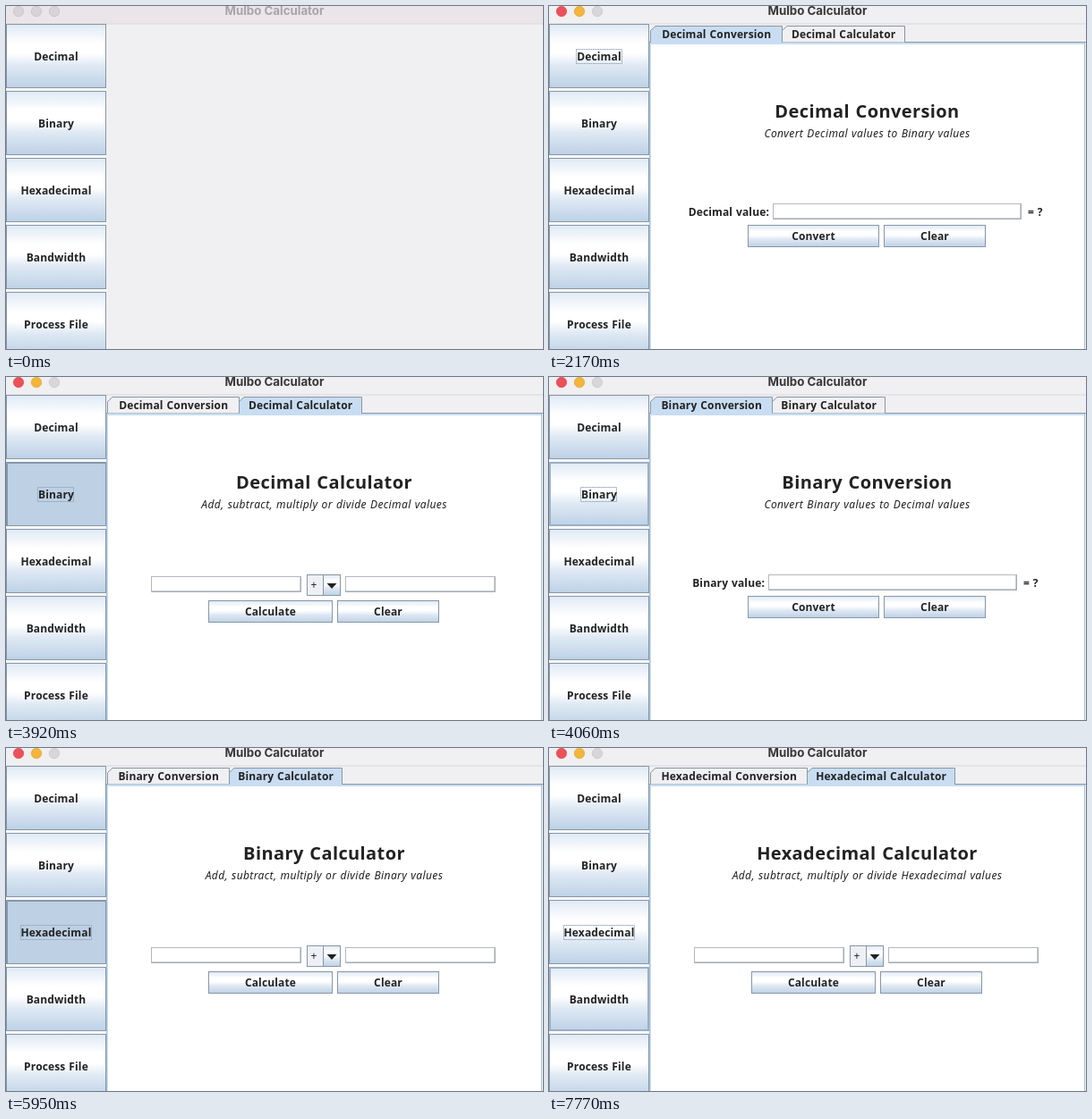
These frames come from a looping animation (600 px wide and 384 px high, 8000 ms). An HTML page:

```html
<!DOCTYPE html>
<html lang="en">
<head>
<meta charset="utf-8">
<title>Calculator demo</title>
<style>
html, body { margin: 0; width: 100%; height: 100%; overflow: hidden; background: #f0f0f2; }
svg { display: block; width: 600px; height: 384px; }
text { font: bold 12px "Noto Sans", "Open Sans", sans-serif; fill: #222; letter-spacing: .012em; word-spacing: .05em; }
.heading { font-size: 20px; letter-spacing: .02em; }
.sub { font-weight: normal; font-style: italic; letter-spacing: .032em; }
.plain { font-weight: normal; }
.title { font: 700 13.3px Inter, Roboto, sans-serif; letter-spacing: 0; word-spacing: 0; }
</style>
</head>
<body>
<svg id="stage" viewBox="0 0 600 384">
  <defs>
    <linearGradient id="metal" x2="0" y2="1">
      <stop stop-color="#dfe9f4"/>
      <stop offset=".3" stop-color="#fff"/>
      <stop offset=".46" stop-color="#fff"/>
      <stop offset=".65" stop-color="#dfe9f4"/>
      <stop offset="1" stop-color="#bdd1e6"/>
    </linearGradient>
  </defs>
  <g id="scene"></g>
</svg>
<script>
const LOOP = 8000, MID = 355.5, EDGE = '#8796a6', BLUE = '#c9ddf2', RIM = '#a9bfd6';
const MENU = ['Decimal', 'Binary', 'Hexadecimal', 'Bandwidth', 'Process File'];
const FOCUS_WIDTH = [51, 40, 79];
const MODES = [
  { name: 'Decimal', to: 'Binary', tabs: [113, 260, 397], field: 250 },
  { name: 'Binary', to: 'Decimal', tabs: [113, 249, 375], field: 245 },
  { name: 'Hexadecimal', to: 'Decimal', tabs: [113, 288, 453], field: 265 }
];

// Each track lists [start in ms, value]; -1 means none.
const TRACKS = {
  hover: [[0, -1], [1050, 1], [1190, 0], [2170, -1], [3640, 1], [4410, -1], [5670, 2], [6300, -1], [7700, 2], [7770, 3]],
  press: [[0, -1], [1400, 0], [1540, -1], [3920, 1], [4060, -1], [5880, 2], [6020, -1]],
  focus: [[0, -1], [1400, 0], [3920, 1], [5880, 2]],
  view: [[0, -1], [1540, 0], [3150, 1], [4060, 2], [5040, 3], [6020, 4], [7140, 5]]
};
const valueAt = (track, t) => track.filter(([start]) => start <= t).pop()[1];

const rect = (x, y, w, h, fill, stroke = 'none', more = '') =>
  `<rect x="${x}" y="${y}" width="${w}" height="${h}" fill="${fill}" stroke="${stroke}" ${more}/>`;
const path = (d, fill, stroke = 'none') => `<path d="${d}" fill="${fill}" stroke="${stroke}"/>`;
const text = (s, x, y, cls = '', anchor = 'middle', more = '') =>
  `<text x="${x}" y="${y}" class="${cls}" text-anchor="${anchor}" ${more}>${s}</text>`;

function titleBar(active) {
  const lights = active ? ['#ec5059', '#f3b53a', '#d8d6d8'] : ['#d9d3d8', '#d9d3d8', '#d9d3d8'];
  const rims = active ? ['#dc4850', '#e0a535', '#c8c6c8'] : ['#c4bec3', '#c4bec3', '#c4bec3'];
  return rect(0, 0, 600, 20, active ? '#f0eff1' : '#ebe5ea') + rect(0, 19.5, 600, 1, '#d9d7da') +
    lights.map((c, i) => `<circle cx="${14 + 20 * i}" cy="6" r="5.7" fill="${c}" stroke="${rims[i]}" stroke-width=".7"/>`).join('') +
    text('Mulbo Calculator', 300, 10, 'title', 'middle', `style="fill:${active ? '#383838' : '#aaa4a9'}"`);
}

function menuButton(label, i, { hover, press, focus }) {
  const y = 20 + 75 * i, down = press === i;
  let out = rect(0, y, 112, 75, '#fafbfc') +
    rect(.5, y + .5, 111, 71, down ? '#bdd0e4' : 'url(#metal)', EDGE);
  if (down) out += path(`M1.5 ${y + 71}V${y + 1.5}H111`, 'none', '#8497aa');
  else if (hover === i) out += rect(1, y + 1, 110, 70, 'none', '#9bafc4', 'stroke-width="2"');
  if (focus === i) {
    const w = FOCUS_WIDTH[i];
    out += rect(Math.round(56 - w / 2) - .5, y + 28.5, w, 16, 'none', '#94a9bf', 'stroke-dasharray="1.5 .5"');
  }
  return out + text(label, 56, y + 41);
}

const field = (x, y, w) => rect(x + .5, y + .5, w - 1, 17, '#fff', '#b4b8be') +
  path(`M${x + 1} ${y + 17}H${x + w - 1}V${y + 1}`, 'none', '#98a0a9');

const button = (label, x, y, w) => rect(x + .5, y + .5, w - 1, 24, 'url(#metal)', EDGE) +
  text(label, x + w / 2, y + 17);

function tab(label, x, end, on) {
  return path(`M${x + .5} 40.5V27.5L${x + 6} 22.5H${end + .5}V40.5`, on ? BLUE : '#f0f0f2', EDGE) +
    text(label, (x + end) / 2 + .7, 36);
}

function conversion({ name, to, field: x }) {
  return text(`Convert ${name} values to ${to} values`, MID, 147, 'sub') +
    text(`${name} value:`, x - 4, 235, '', 'end') + field(x, 221, 278) +
    text('= ?', x + 285, 235, '', 'start') +
    button('Convert', 222, 245, 147) + button('Clear', 374, 245, 114);
}

function calculator({ name }) {
  return text(`Add, subtract, multiply or divide ${name} values`, MID, 147, 'sub') +
    field(162, 223, 168) + field(379, 223, 168) +
    rect(336.5, 221.5, 37, 23, 'url(#metal)', EDGE) + rect(337, 222, 17, 22, '#edf1f5') +
    path('M354.5 222V244', 'none', EDGE) + path('M358.5 231H369.5L364 237Z', '#222') +
    text('+', 344, 237, 'plain') +
    button('Calculate', 226, 250, 139) + button('Clear', 370, 250, 114);
}

function panel(view) {
  const mode = MODES[view >> 1], on = view % 2, [a, b, c] = mode.tabs;
  const kinds = ['Conversion', 'Calculator'];
  return rect(112, 40, 488, 344, BLUE) + rect(114, 43, 484, 341, '#fff') +
    rect(599, 41, 1, 343, '#f0f0f2') +
    path('M112 40.5H600', 'none', EDGE) + path('M112.5 41V384M598.5 41V384', 'none', RIM) +
    tab(`${mode.name} ${kinds[0]}`, a, b, !on) + tab(`${mode.name} ${kinds[1]}`, b, c, on) +
    rect(mode.tabs[on] + 1, 40, mode.tabs[on + 1] - mode.tabs[on] - 1, 1, BLUE) +
    text(`${mode.name} ${kinds[on]}`, MID, 125, 'heading') +
    (on ? calculator : conversion)(mode);
}

const scene = document.getElementById('scene');
let shown = '';
function draw() {
  const t = performance.now() % LOOP, state = {};
  for (const key in TRACKS) state[key] = valueAt(TRACKS[key], t);
  const key = JSON.stringify(state);
  if (key !== shown) {
    shown = key;
    scene.innerHTML = rect(0, 0, 600, 384, '#f0f0f2') + titleBar(state.focus >= 0) +
      (state.view >= 0 ? panel(state.view) : '') +
      MENU.map((label, i) => menuButton(label, i, state)).join('');
  }
  requestAnimationFrame(draw);
}
draw();
</script>
</body>
</html>
```
